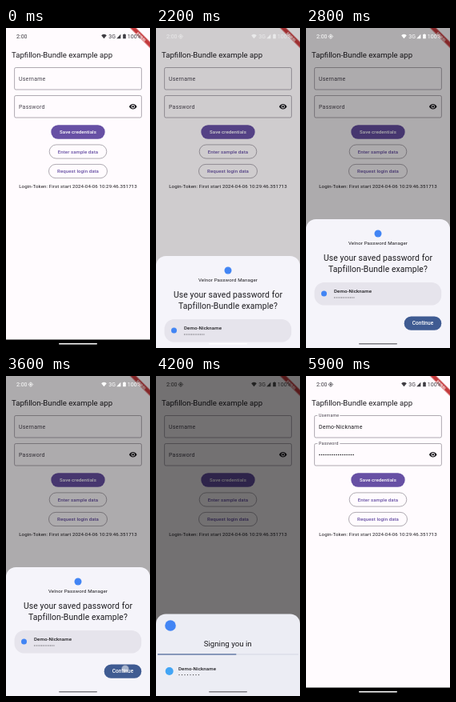
An HTML page for the animation above (6 s loop, 180 by 400 pixels).

```html
<!DOCTYPE html>
<html lang="en">
<head>
<meta charset="utf-8">
<title>Saved login demo</title>
<style>
html, body { margin: 0; width: 100%; height: 100%; overflow: hidden; background: #fffbfe; }
svg { display: block; width: 180px; height: 400px; }
text { font-family: Roboto, sans-serif; fill: #1c1b1f; }
.mid { text-anchor: middle; }
.title { font-size: 9.64px; }
.label { font-size: 7px; letter-spacing: .22px; fill: #49454f; }
.value { font-size: 7px; letter-spacing: .22px; }
.button { font-size: 6.13px; font-weight: 500; letter-spacing: .04px; fill: #6750a4; }
.white { fill: #fff; }
.small { font-size: 6.13px; letter-spacing: .1px; }
.strong { font-weight: 500; }
.head { font-size: 10.4px; letter-spacing: .1px; }
.outline { fill: none; stroke: #79747e; stroke-width: .6; }
.dots { stroke: #1c1b1f; stroke-linecap: round; fill: none; }
.status { fill: currentColor; }
.status text { font-size: 7px; fill: inherit; }

/* everything runs on the same six second clock */
.status, .locate, .press, .tap, .scrim, .pick, .sign, .bar, .float, .gap, .filled, .handle {
  animation: 6s linear infinite both;
}
.status { animation-name: status; }
.locate { animation-name: locate; }
.press { animation-name: press; }
.tap { animation-name: tapRequest; fill: #fff; stroke: #8a8790; stroke-width: .4; }
.tap.next { animation-name: tapNext; }
.scrim { animation-name: scrim; }
.pick { animation-name: pick; }
.sign { animation-name: sign; }
.bar { animation-name: bar; transform-origin: 2px 0; }
.float { animation-name: float; }
.gap { animation-name: gap; transform-box: fill-box; transform-origin: center; fill: #fffbfe; }
.filled { animation-name: filled; }
.handle { animation-name: handle; }

@keyframes status {
  0%, 34.2% { color: #3f3d43; }
  37%, 63.2% { color: #fff; }
  65%, 75% { color: #222; }
  78.7%, 100% { color: #3f3d43; }
}
@keyframes locate {
  0%, 4.8% { opacity: 0; }
  10%, 99.9% { opacity: 1; }
  100% { opacity: 0; }
}
@keyframes press {
  0%, 28.2% { opacity: 0; }
  28.3%, 31.7% { opacity: .07; }
  35%, 100% { opacity: 0; }
}
@keyframes tapRequest {
  0%, 28.2% { opacity: 0; }
  28.3%, 30% { opacity: .5; }
  31.6%, 100% { opacity: 0; }
}
@keyframes tapNext {
  0%, 59.1% { opacity: 0; }
  59.9%, 61.5% { opacity: .55; }
  62.5%, 100% { opacity: 0; }
}
@keyframes scrim {
  0%, 34.2% { opacity: 0; }
  38.4%, 65% { opacity: .32; }
  69.2%, 75% { opacity: .55; }
  78.7%, 100% { opacity: 0; }
}
@keyframes pick {
  0%, 34.2% { transform: translateY(164px); animation-timing-function: cubic-bezier(.215, .61, .355, 1); }
  41.7%, 62.5% { transform: none; animation-timing-function: cubic-bezier(.4, 0, 1, 1); }
  65.8%, 100% { transform: translateY(164px); }
}
@keyframes sign {
  0%, 65% { transform: translateY(106px); animation-timing-function: cubic-bezier(.2, .7, .3, 1); }
  69.2%, 75% { transform: none; animation-timing-function: cubic-bezier(.4, 0, 1, 1); }
  79.2%, 100% { transform: translateY(106px); }
}
@keyframes bar {
  0%, 65.8% { transform: scaleX(0); }
  70% { transform: scaleX(.557); }
  75%, 100% { transform: scaleX(1); }
}
@keyframes float {
  0%, 80.2% { transform: none; animation-timing-function: cubic-bezier(.4, 0, .2, 1); }
  83%, 99.95% { transform: translateY(-14.6px) scale(.75); }
  100% { transform: none; }
}
@keyframes gap {
  0%, 80.2% { transform: scaleX(0); }
  83%, 99.95% { transform: none; }
  100% { transform: scaleX(0); }
}
@keyframes filled {
  0%, 79.6% { opacity: 0; }
  79.7%, 99.95% { opacity: 1; }
  100% { opacity: 0; }
}
@keyframes handle {
  0%, 39.6% { fill: #fff; }
  43%, 77% { fill: #7d7c82; }
  78.5%, 100% { fill: #fff; }
}
</style>
</head>
<body>
<svg viewBox="0 0 180 400">
  <rect width="180" height="400" fill="#fffbfe"/>

  <!-- app -->
  <text class="title" x="7" y="36.6">Tapfillon-Bundle example app</text>

  <rect class="outline" x="10.6" y="49.5" width="158.8" height="27.5" rx="1.75"/>
  <rect class="gap" x="14.3" y="48.8" width="28" height="1.5"/>
  <g transform="translate(16 65.6)"><text class="label float">Username</text></g>
  <text class="value filled" x="16" y="65.8">Demo-Nickname</text>

  <rect class="outline" x="10.6" y="84.5" width="158.8" height="27.5" rx="1.75"/>
  <rect class="gap" x="14.3" y="83.8" width="28" height="1.5"/>
  <g transform="translate(16 100.5)"><text class="label float">Password</text></g>
  <path class="dots filled" d="M17 98.5h42.2" stroke-width="1.6" stroke-dasharray="0 2.63"/>
  <path transform="translate(153.5 93) scale(.438)" fill="#1c1b1f" d="M12 4.5C7 4.5 2.73 7.61 1 12c1.73 4.39 6 7.5 11 7.5s9.27-3.11 11-7.5c-1.73-4.39-6-7.5-11-7.5zM12 17a5 5 0 1 1 0-10 5 5 0 0 1 0 10zm0-8a3 3 0 1 0 0 6 3 3 0 0 0 0-6z"/>

  <rect x="56.3" y="121.2" width="67.4" height="17.5" rx="8.75" fill="#6750a4"/>
  <text class="button white mid" x="90" y="132.1">Save credentials</text>
  <rect class="outline" x="54.2" y="145.9" width="71.6" height="17.2" rx="8.6"/>
  <text class="button mid" x="90" y="156.7">Enter sample data</text>
  <rect class="outline" x="53.5" y="170.4" width="73" height="17.2" rx="8.6"/>
  <rect class="press" x="53.5" y="170.4" width="73" height="17.2" rx="8.6" fill="#6750a4"/>
  <text class="button mid" x="90" y="181.2">Request login data</text>
  <circle class="tap" cx="111" cy="178.5" r="4.6"/>
  <text class="small mid" x="90" y="199.6">Login-Token: First start 2024-04-06 10:29:46.351713</text>

  <g transform="translate(180 0) rotate(45)">
    <rect x="-18" y="12.3" width="36" height="5.2" fill="#c43a3c"/>
    <text class="white mid" y="16.5" font-size="4.4" font-weight="900">DEBUG</text>
  </g>
  <rect y="389.5" width="180" height="10.5"/>

  <rect class="scrim" width="180" height="400"/>

  <!-- status bar -->
  <g class="status">
    <text x="13" y="13">2:00</text>
    <g class="locate">
      <path d="M30.9 7.4v1M30.9 12.8v1M27.7 10.6h1M33.1 10.6h1" stroke="currentColor" stroke-width=".6"/>
      <circle cx="30.9" cy="10.6" r="2.2" fill="none" stroke="currentColor" stroke-width=".6"/>
      <circle cx="30.9" cy="10.6" r="1.1"/>
    </g>
    <path d="M119.2 9.2q3.3-2.8 6.6 0L122.5 13.2z"/>
    <text x="128.3" y="13">3G</text>
    <path d="M138.2 13.2h5.2v-5.4z"/>
    <path d="M146.2 8.1h1v-.7h1.6v.7h1v5.2h-3.6z"/>
    <text x="151.8" y="13">100%</text>
  </g>

  <!-- choose a saved login -->
  <g class="pick">
    <rect y="239" width="180" height="180" rx="12.3" fill="#f5f4fa"/>
    <circle cx="90" cy="257" r="4.5" fill="#4285f4"/>
    <text class="small mid" x="90" y="271.3">Velnor Password Manager</text>
    <text class="head mid" x="90" y="290.6">Use your saved password for</text>
    <text class="head mid" x="90" y="304.6">Tapfillon-Bundle example?</text>
    <rect x="10.5" y="318" width="158.7" height="28.5" rx="12.3" fill="#e6e4ec"/>
    <circle cx="22.5" cy="332" r="3.5" fill="#4285f4"/>
    <text class="small strong" x="35" y="331.2">Demo-Nickname</text>
    <path class="dots" d="M35.7 337h24.3" stroke-width="1" stroke-dasharray="0 2.2"/>
    <rect x="122.7" y="360.5" width="46.6" height="17.3" rx="8.65" fill="#3f5b92"/>
    <text class="button white mid" x="146" y="371.2" style="font-size: 6.5px">Continue</text>
    <circle class="tap next" cx="149" cy="366" r="4.6"/>
  </g>

  <!-- signing in -->
  <g class="sign">
    <rect y="297.5" width="180" height="130" rx="12.3" fill="#ecedf4"/>
    <circle cx="18" cy="312" r="6.8" fill="#4285f4"/>
    <text class="mid" x="89.7" y="337.6" font-size="9.7">Signing you in</text>
    <rect x="2" y="347.4" width="176" height="1.1" fill="#d8dae6"/>
    <rect class="bar" x="2" y="347.4" width="176" height="1.1" fill="#3f5b92"/>
    <circle cx="16.7" cy="369" r="5" fill="#42a5f5"/>
    <text class="small strong" x="28" y="367.5">Demo-Nickname</text>
    <path class="dots" d="M29 373.6h24.6" stroke-width="1.1" stroke-dasharray="0 3.5"/>
  </g>

  <rect class="handle" x="66" y="393.9" width="48" height="1.5" rx=".75"/>
</svg>
</body>
</html>
```
